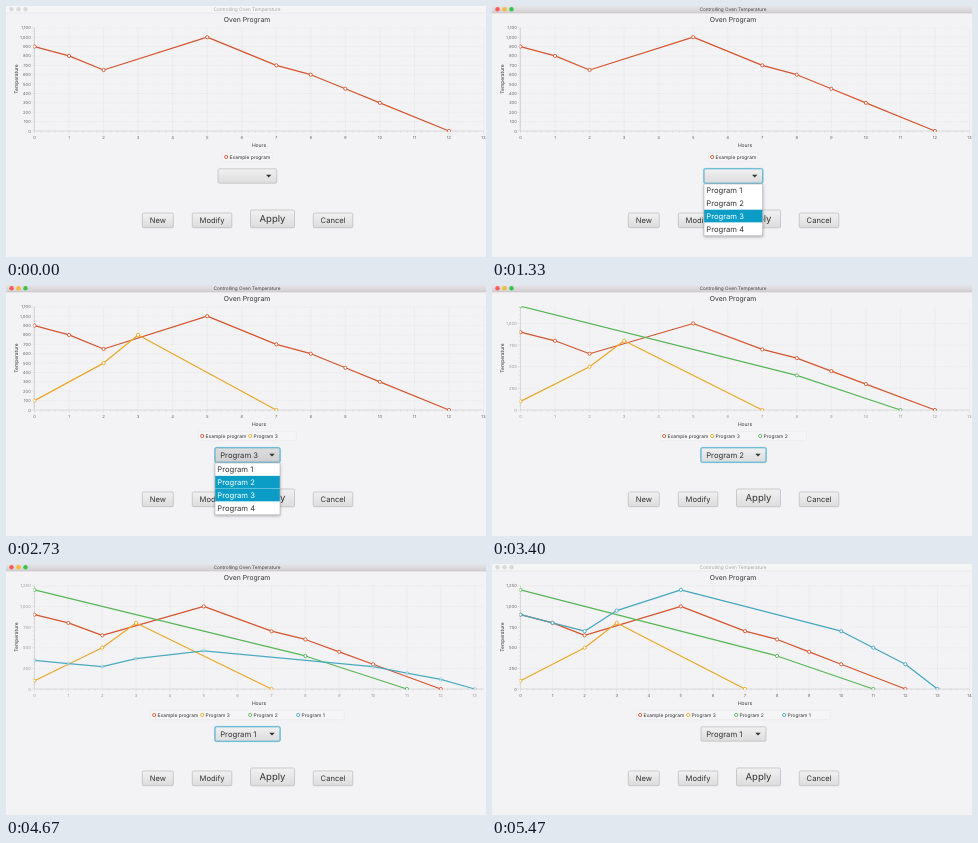
Recreate the animation shown at these times as an HTML page with a canvas. Size 480 by 251 pixels, loop 5.54 s.

```html
<!DOCTYPE html>
<html lang="en">
<head>
<meta charset="utf-8">
<title>Oven Program</title>
<style>
html, body { margin: 0; width: 100%; height: 100%; overflow: hidden; background: #f3f2f4; }
canvas { display: block; width: 480px; height: 251px; }
</style>
</head>
<body>
<canvas id="stage"></canvas>
<script>
const LOOP = 5540, W = 480, H = 251;
const LEFT = 28.5, RIGHT = 477.5, TOP = 21.8, BOTTOM = 125;
const FONT = 'Inter, "Open Sans", sans-serif';

const series = [
  { name: 'Example program', color: '#d5562f', start: -1000,
    points: [[0, 900], [1, 800], [2, 650], [5, 1000], [7, 700], [8, 600], [9, 450], [10, 300], [12, 0]] },
  { name: 'Program 3', color: '#eaa82c', start: 1480,
    points: [[0, 100], [2, 500], [3, 800], [7, 0]] },
  { name: 'Program 2', color: '#57b757', start: 2890,
    points: [[0, 1200], [8, 400], [11, 0]] },
  { name: 'Program 1', color: '#45a8bf', start: 4478,
    points: [[0, 900], [1, 800], [2, 700], [3, 950], [5, 1200], [10, 700], [11, 500], [12, 300], [13, 0]] }
];

// Popup opening times and the row under the pointer from each moment on
const popups = [
  { open: 670, close: 1470, hover: [[800, 1], [1100, 2], [1250, 3]] },
  { open: 2130, close: 2880, hover: [[2330, 1], [2530, 2]] },
  { open: 3930, close: 4470, hover: [[4130, 1]] }
];
const ACTIVE = [500, 5400], Y_RESCALE = 2947, X_RESCALE = 4478, RESCALE = 700;

const canvas = document.getElementById('stage');
const dpr = window.devicePixelRatio || 1;
canvas.width = W * dpr;
canvas.height = H * dpr;
const c = canvas.getContext('2d');
c.textRendering = 'geometricPrecision';

const clamp = v => Math.max(0, Math.min(1, v));
const mix = (a, b, p) => a + (b - a) * p;

function text(s, x, y, size, color = '#333', align = 'center') {
  c.font = `${size}px ${FONT}`;
  c.textAlign = align;
  c.textBaseline = 'alphabetic';
  c.fillStyle = color;
  c.fillText(s, x, y + size * 0.36);
}

function line(x1, y1, x2, y2, color, width = 0.5) {
  c.beginPath();
  c.moveTo(x1, y1);
  c.lineTo(x2, y2);
  c.strokeStyle = color;
  c.lineWidth = width;
  c.stroke();
}

function dot(x, y, r, fill, stroke) {
  c.beginPath();
  c.arc(x, y, r, 0, 7);
  c.fillStyle = fill;
  c.fill();
  if (stroke) {
    c.strokeStyle = stroke;
    c.lineWidth = 0.9;
    c.stroke();
  }
}

function shade(y, h, from, to) {
  const g = c.createLinearGradient(0, y, 0, y + h);
  g.addColorStop(0, from);
  g.addColorStop(1, to);
  return g;
}

function box(x, y, w, h, border, from = '#f1f1f1', to = '#dcdcdc', width = 0.7) {
  c.beginPath();
  c.roundRect(x, y, w, h, 1.3);
  c.fillStyle = shade(y, h, from, to);
  c.fill();
  c.strokeStyle = border;
  c.lineWidth = width;
  c.stroke();
}

function button(label, x, y, w, h, size = 7.6) {
  box(x, y, w, h, '#b9b9b9');
  text(label, x + w / 2, y + h / 2, size);
}

function titleBar(active) {
  c.fillStyle = active ? shade(0, 7, '#e6e4e6', '#d2d0d2') : '#f5f5f5';
  c.fillRect(0, 0, W, 7);
  line(0, 7, W, 7, active ? '#bdbbbd' : '#dddddd', 0.5);
  const lights = active ? ['#fa5b55', '#f6bb3d', '#37c649'] : Array(3).fill('#d9d9d9');
  lights.forEach((color, i) => dot(5.5 + 7 * i, 3.2, 2.2, color));
  text('Controlling Oven Temperature', 241, 3.4, 4.73, active ? '#444' : '#a5a5a5');
}

function chart(t) {
  const px = clamp((t - X_RESCALE) / RESCALE);
  const py = clamp((t - Y_RESCALE) / RESCALE);
  const w = RIGHT - LEFT, h = BOTTOM - TOP;
  const kx = mix(w / 13, w / 14, px), ky = mix(h / 1100, h / 1250, py);
  const X = v => LEFT + v * kx, Y = v => BOTTOM - v * ky;
  const step = py > 0 ? 250 : 100;
  const moving = (px > 0 && px < 1) || (py > 0 && py < 1);
  const ink = moving ? '#999' : '#666';
  const grid = '#dfdee0', axis = '#c4c4c6';

  text('Oven Program', 241, 13.3, 6.85);
  for (let i = 0; X(i / 5) <= RIGHT + 0.1; i++) {
    const x = X(i / 5), major = i % 5 === 0;
    if (major) {
      c.setLineDash([1.3, 1]);
      line(x, TOP, x, BOTTOM, grid);
      c.setLineDash([]);
      text(i / 5, x, 131.6, 4.2, ink);
    }
    line(x, BOTTOM, x, BOTTOM + (major ? 2.6 : 1.6), axis, 0.4);
  }
  for (let i = 0; Y(i * step / 5) >= TOP - 0.1; i++) {
    const v = i * step / 5, y = Y(v), major = i % 5 === 0;
    if (major) {
      c.setLineDash([1.3, 1]);
      line(LEFT, y, RIGHT, y, grid);
      c.setLineDash([]);
      text(v.toLocaleString('en-US'), 24.8, y, 4.2, ink, 'right');
    }
    line(LEFT - (major ? 2.6 : 1.6), y, LEFT, y, axis, 0.4);
  }
  line(LEFT, TOP, LEFT, BOTTOM, axis);
  line(LEFT, BOTTOM, RIGHT, BOTTOM, axis);
  text('Hours', 253, 139, 5);
  c.save();
  c.translate(9.8, 73);
  c.rotate(-Math.PI / 2);
  text('Temperature', 0, 0, 4.9);
  c.restore();

  c.save();
  c.beginPath();
  c.rect(LEFT - 1, TOP - 0.5, w + 2, h + 1.3);
  c.clip();
  const shown = series.filter(s => t >= s.start);
  for (const s of shown) {
    const age = t - s.start, grow = clamp(age / 500);
    const spots = s.points.map(([x, y]) => [X(x), Y(y * grow)]);
    c.globalAlpha = clamp(age / 200);
    c.beginPath();
    spots.forEach(p => c.lineTo(...p));
    c.strokeStyle = s.color;
    c.lineWidth = 1.25;
    c.lineJoin = 'round';
    c.stroke();
    c.globalAlpha = grow;
    spots.forEach(p => dot(...p, 1.6, '#fff', s.color));
  }
  c.restore();
  legend(shown);
}

function legend(shown) {
  const width = shown.length * 48 + 2, left = 241.3 - width / 2;
  c.beginPath();
  c.roundRect(left, 146.3, width, 9.4, 1.5);
  c.fillStyle = '#f5f4f6';
  c.fill();
  c.strokeStyle = '#e6e5e7';
  c.lineWidth = 0.5;
  c.stroke();
  shown.forEach((s, i) => {
    const x = left + 3.9 + 48 * i;
    dot(x, 151, 1.6, '#fff', s.color);
    text(s.name, x + 3.4, 151.1, 4.9, '#333', 'left');
  });
}

function comboBox(t, active, popup) {
  const choice = series.slice(1).filter(s => t >= s.start - 10).pop();
  const x = choice ? 209 : 212, w = choice ? 65 : 58.7;
  if (active) {
    c.beginPath();
    c.roundRect(x - 0.5, 162.3, w + 1, 15.4, 1.8);
    c.strokeStyle = '#b5dcea';
    c.lineWidth = 1;
    c.stroke();
  }
  const pressed = popup && choice;
  box(x, 162.8, w, 14.4, active ? '#3fa9cb' : '#b9b9b9',
    pressed ? '#dedede' : '#f1f1f1', pressed ? '#cfcfcf' : '#dcdcdc', active ? 0.9 : 0.7);
  if (choice) text(choice.name, 214.2, 170, 7.7, '#333', 'left');
  const ax = x + w - 8;
  c.beginPath();
  c.moveTo(ax - 2.7, 168.7);
  c.lineTo(ax + 2.7, 168.7);
  c.lineTo(ax, 171.6);
  c.fillStyle = '#333';
  c.fill();
  if (popup) list(t, popup, x, w, choice);
}

function list(t, popup, x, w, choice) {
  const y = 178, row = 12.85;
  c.save();
  c.shadowColor = 'rgba(0,0,0,.3)';
  c.shadowBlur = 3 * dpr;
  c.shadowOffsetY = dpr;
  c.fillStyle = '#fff';
  c.fillRect(x, y, w, row * 4 + 0.4);
  c.restore();
  const hovered = (popup.hover.filter(h => t >= h[0]).pop() || [0, 0])[1];
  for (let i = 1; i <= 4; i++) {
    const name = 'Program ' + i, top = y + row * (i - 1);
    const lit = i === hovered || (choice && choice.name === name);
    if (lit) {
      c.fillStyle = '#0b9dc6';
      c.fillRect(x, top, w, row - 0.2);
    }
    text(name, x + 2.3, top + row / 2, 7.65, lit ? '#fff' : '#333', 'left');
  }
  c.strokeStyle = '#b4b4b4';
  c.lineWidth = 0.6;
  c.strokeRect(x, y, w, row * 4 + 0.4);
}

function draw(t) {
  const active = t >= ACTIVE[0] && t < ACTIVE[1];
  c.setTransform(dpr, 0, 0, dpr, 0, 0);
  c.fillStyle = '#f3f2f4';
  c.fillRect(0, 0, W, H);
  titleBar(active);
  chart(t);
  button('New', 136.3, 207, 31, 14.7);
  button('Modify', 186.3, 207, 39.5, 14.7);
  button('Apply', 244.5, 204, 44, 17.8, 9.5);
  button('Cancel', 307.3, 207, 39.5, 14.7);
  comboBox(t, active, popups.find(p => t >= p.open && t < p.close));
}

function tick() {
  draw(performance.now() % LOOP);
  requestAnimationFrame(tick);
}
tick();
</script>
</body>
</html>
```
